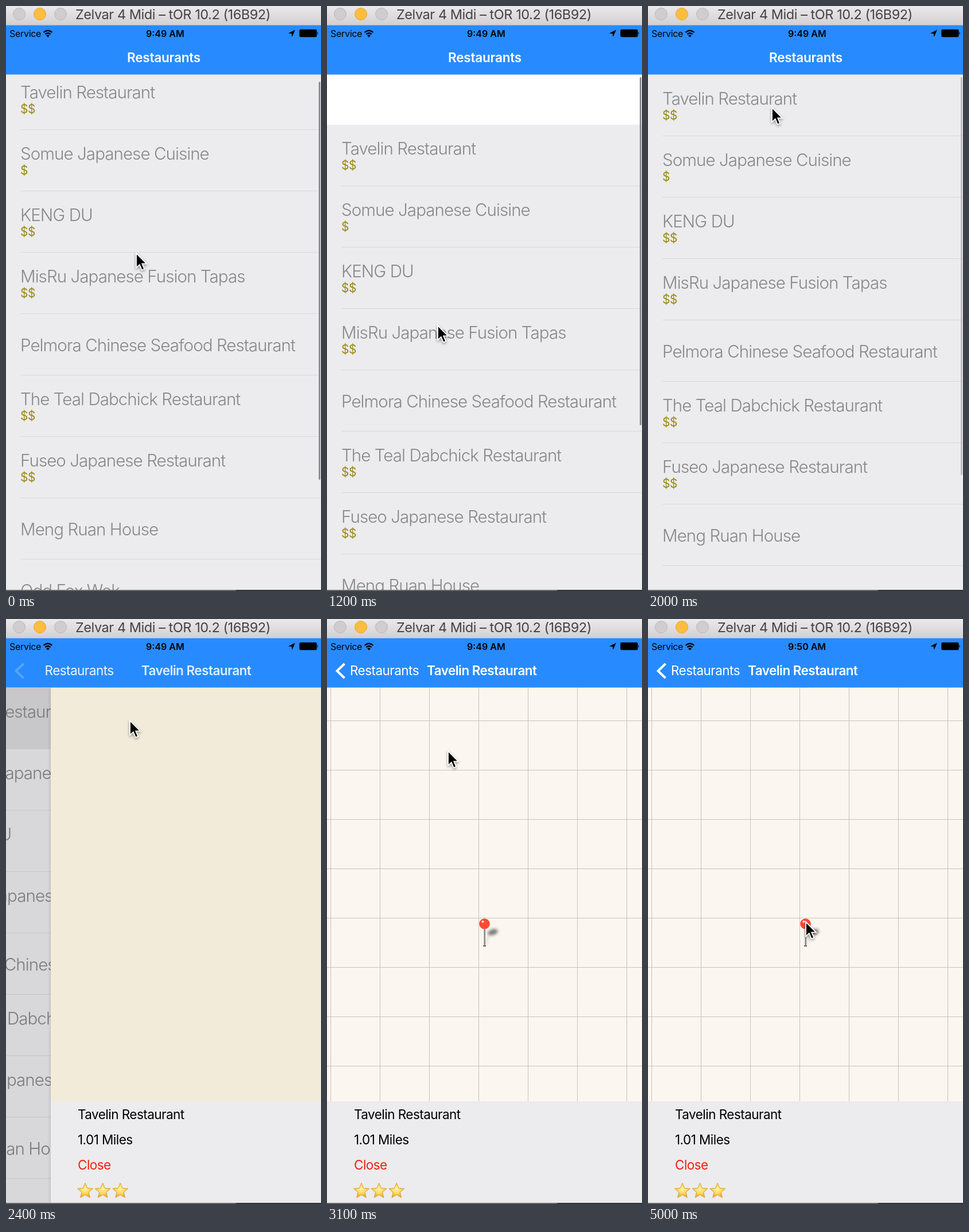
Animation, 549 px wide and 1020 px high, one loop 5.1 s. Source, as an HTML page:

```html
<!DOCTYPE html>
<html lang="en">
<head>
<meta charset="utf-8">
<title>Restaurants</title>
<style>
html, body { margin: 0; width: 100%; height: 100%; overflow: hidden; background: #ecebed; }
#stage {
  position: relative; width: 549px; height: 1020px; overflow: hidden;
  font: 22.5px Inter, "Liberation Sans", sans-serif;
  font-optical-sizing: none; letter-spacing: -.024em; white-space: nowrap;
}
#stage div, #stage svg { position: absolute; }
.t { line-height: 40px; height: 40px; margin-top: -20px; }

#titlebar { width: 549px; height: 33px; background: linear-gradient(#ebe9eb, #d2d0d2); }
#titlebar .t { left: 121px; top: 15px; font-size: 23.5px; letter-spacing: -.45px; color: #464347; }
.light { top: 3px; width: 20px; height: 20px; border-radius: 50%; background: #cfcdd0; border: 1px solid #b9b7ba; }

#nav {
  top: 33px; width: 549px; height: 87px; overflow: hidden; color: #fff; background: #278bff;
  box-shadow: inset 0 1px #7daee8, inset 0 -1px #8abbf6;
}
#nav .t { top: 57px; }
#nav .status { top: 15px; font-size: 16px; letter-spacing: 0; color: #000; }
.bold { font-weight: 600; }
#rootTitle { letter-spacing: -.01em; }

#view { top: 120px; width: 549px; height: 898px; overflow: hidden; background: #fff; }
#list { width: 549px; height: 898px; }
.row { width: 549px; height: 107px; background: #ecebed; }
.row::after { content: ""; position: absolute; left: 25px; right: 0; bottom: 0; height: 1px; background: #d9d8da; }
.name { left: 25px; font-size: 29.5px; font-weight: 270; letter-spacing: -.0315em; color: #88878a; }
.price { left: 25px; top: 71px; font-size: 21px; letter-spacing: -.5px; color: #978a12; }
#bar { left: 545px; width: 3px; border-radius: 2px; background: #8d8c90; }
#dim { width: 549px; height: 898px; background: #000; }

#detail { width: 549px; height: 898px; background: #ecebed; box-shadow: 0 0 6px rgba(0, 0, 0, .18); }
#map { width: 549px; height: 721px; background: #f3ebd9; overflow: hidden; }
#map.loaded {
  background:
    linear-gradient(#c6c3bf 1px, transparent 1px) 0 57px / 86px 86px,
    linear-gradient(90deg, #c6c3bf 1px, transparent 1px) 6px 0 / 86px 86px,
    #fbf6f0;
}
#detail .t { left: 47px; color: #000; }
#edge { top: 1018px; width: 549px; height: 2px; background: linear-gradient(90deg, #68676b 400px, #343337 402px); }
</style>
</head>
<body>
<div id="stage">
  <div id="view">
    <div id="list"></div>
    <div id="bar"></div>
    <div id="dim"></div>
    <div id="detail">
      <div id="map">
        <svg id="pin" width="60" height="70" style="left:254px;top:396px">
          <defs>
            <filter id="blur" x="-50%" y="-50%" width="200%" height="200%"><feGaussianBlur stdDeviation="2.4"/></filter>
            <linearGradient id="steel"><stop stop-color="#aaa"/><stop offset="1" stop-color="#666"/></linearGradient>
          </defs>
          <g filter="url(#blur)">
            <ellipse cx="35" cy="30" rx="9" ry="5" transform="rotate(-18 35 30)" opacity=".5"/>
            <path d="M21 53 L29 33" stroke="#000" stroke-width="2" opacity=".2"/>
          </g>
          <path d="M18 54h5" stroke="#555" stroke-width="2"/>
          <rect x="19.3" y="23" width="2.5" height="31" fill="url(#steel)"/>
          <circle cx="20.5" cy="15.5" r="9.3" fill="#fc4a35"/>
          <circle cx="17.5" cy="11.7" r="2" fill="#fff" opacity=".9"/>
        </svg>
      </div>
      <div class="t" style="top:744px">Tavelin Restaurant</div>
      <div class="t" style="top:788px">1.01 Miles</div>
      <div class="t" style="top:832px;color:#f02010">Close</div>
      <svg id="stars" width="100" height="34" style="left:45px;top:860px">
        <defs>
          <radialGradient id="gold" cy=".4"><stop stop-color="#fff3a8"/><stop offset=".65" stop-color="#fdd95a"/><stop offset="1" stop-color="#f3b233"/></radialGradient>
        </defs>
      </svg>
    </div>
  </div>

  <div id="nav">
    <div class="t status" style="left:6px;letter-spacing:-.3px">Service</div>
    <div class="t status bold" id="clock" style="left:244px"></div>
    <svg width="18" height="14" style="left:64px;top:8px" fill="none" stroke="#000" stroke-width="2.3">
      <path d="M1.5 5 Q9 -1.5 16.5 5M4.3 8.2 Q9 4.2 13.7 8.2"/>
      <path d="M9 13.5 L6 10.4 Q9 8 12 10.4Z" fill="#000" stroke="none"/>
    </svg>
    <svg width="58" height="15" style="left:490px;top:7px">
      <path d="M2 7.5 L14 1.5 L8.5 14 L7.7 8.2Z"/>
      <rect x="21.5" y="1" width="30" height="13" rx="2" stroke="#000" stroke-opacity=".35"/>
      <path d="M52.5 5 q2.5 2.5 0 5z"/>
    </svg>
    <div class="t bold" id="rootTitle">Restaurants</div>
    <svg id="chevron" width="24" height="32" style="left:12px;top:41px" fill="none" stroke="#fff" stroke-width="4">
      <path d="M18.5 4 L5.5 16.5 L18.5 29"/>
    </svg>
    <div class="t" id="backTitle">Restaurants</div>
    <div class="t bold" id="pageTitle">Tavelin Restaurant</div>
  </div>

  <div id="titlebar">
    <div class="light" style="left:12px"></div>
    <div class="light" style="left:48px;background:#fdbd3e;border-color:#e3a73a"></div>
    <div class="light" style="left:84px"></div>
    <div class="t">Zelvar 4 Midi – tOR 10.2 (16B92)</div>
  </div>
  <div id="edge"></div>

  <svg id="cursor" width="30" height="42" style="left:-3px;top:-3px;filter:drop-shadow(0 2px 2px rgba(0,0,0,.4))">
    <path d="M3 3 V28.5 L8.8 23 L12.8 32.5 L17.2 30.6 L13.2 21.3 H21Z" stroke="#fff" stroke-width="1.8"/>
  </svg>
</div>

<script>
const LOOP = 5100, STEP = 100, ROW = 107, WIDTH = 549;
const $ = id => document.getElementById(id);

const places = [
  ["Tavelin Restaurant", "$$"],
  ["Somue Japanese Cuisine", "$"],
  ["KENG DU", "$$"],
  ["MisRu Japanese Fusion Tapas", "$$"],
  ["Pelmora Chinese Seafood Restaurant", ""],
  ["The Teal Dabchick Restaurant", "$$"],
  ["Fuseo Japanese Restaurant", "$$"],
  ["Meng Ruan House", ""],
  ["Odd Fox Wok", ""],
  ["Shailin Duck House", ""],
  ["Pindrum Felvarton", ""]
];

const rows = places.map(([name, price]) => {
  const row = document.createElement("div");
  row.className = "row";
  row.innerHTML = `<div class="t name" style="top:${price ? 41 : 54}px">${name}</div>` +
    `<div class="t price">${price}</div>`;
  $("list").append(row);
  return row;
});

// Three five-pointed stars
for (let s = 0; s < 3; s++) {
  const points = Array.from({ length: 10 }, (_, i) => {
    const a = (i / 5 - .5) * Math.PI, r = i % 2 ? 6.4 : 14;
    return `${15 + s * 30.6 + r * Math.cos(a)},${17.5 + r * Math.sin(a)}`;
  });
  $("stars").insertAdjacentHTML("beforeend",
    `<polygon points="${points.join(" ")}" fill="url(#gold)" stroke="#d79b35" stroke-width="1" stroke-linejoin="round"/>`);
}

const clamp = v => Math.min(1, Math.max(0, v));
const ramp = (t, from, to) => clamp((t - from) / (to - from));

// Each key is [time, value, ...]; values ease between keys
function track(keys, t) {
  const i = keys.findIndex(k => k[0] > t);
  if (i < 0) return keys[keys.length - 1].slice(1);
  const a = keys[i - 1], b = keys[i];
  const u = ramp(t, a[0], b[0]), e = u * u * (3 - 2 * u);
  return a.slice(1).map((v, n) => v + (b[n + 1] - v) * e);
}

const dragKeys = [[0, 11], [600, 269], [1200, -87], [1300, -80]];
const cursorKeys = [
  [0, 227, 431], [600, 190, 168], [1200, 193, 557], [1400, 193, 557], [1900, 216, 177],
  [2600, 216, 177], [3000, 211, 230], [3500, 211, 230], [4600, 275, 528]
];

function scrollAt(t) {
  if (t <= 1300) return track(dragKeys, t)[0];
  const u = (t - 1300) / 90;
  return t < 1900 ? -80 * (1 + u) * Math.exp(-u) : 0;
}

// Critically damped push transition
function pushAt(t) {
  if (t < 2200) return 0;
  if (t >= 2700) return 1;
  const u = (t - 2200) * .01725;
  return 1 - (1 + u) * Math.exp(-u);
}

const move = (el, x, y = 0) => { el.style.transform = `translate(${x}px, ${y}px)`; };

function draw(t) {
  const scroll = scrollAt(t), push = pushAt(t), rest = 1 - push;

  rows.forEach((row, i) => {
    row.style.top = Math.round(i * ROW - scroll) + "px";
  });
  rows[0].style.background = t >= 2100 ? "#dbdadc" : "";
  move($("list"), -.3 * WIDTH * push);

  const bar = $("bar").style;
  bar.top = 4 + Math.max(0, scroll) * .703 + "px";
  bar.height = 694 + Math.min(0, scroll) + "px";
  bar.opacity = 1 - ramp(t, 1900, 2100);

  $("dim").style.opacity = .1 * push;
  $("detail").style.visibility = push ? "visible" : "hidden";
  move($("detail"), Math.round(WIDTH * rest));

  $("map").classList.toggle("loaded", t >= 2700);
  $("pin").style.visibility = t >= 2700 ? "inherit" : "hidden";
  move($("pin"), 0, -480 * (1 - ramp(t, 2700, 3000)) ** 2);

  $("rootTitle").style.opacity = clamp(1 - push * 2);
  move($("rootTitle"), 211 - 171 * push);
  $("backTitle").style.opacity = clamp(push * 2 - .8);
  move($("backTitle"), 40 + 195 * rest);
  $("pageTitle").style.opacity = push;
  move($("pageTitle"), 174 + 437 * rest);
  $("chevron").style.opacity = ramp(push, .82, 1);

  $("clock").textContent = t < 4000 ? "9:49 AM" : "9:50 AM";
  move($("cursor"), ...track(cursorKeys, t));
}

const start = performance.now();
function tick() {
  const t = (performance.now() - start) % LOOP;
  draw(Math.floor(t / STEP) * STEP);
  requestAnimationFrame(tick);
}
tick();
</script>
</body>
</html>
```
